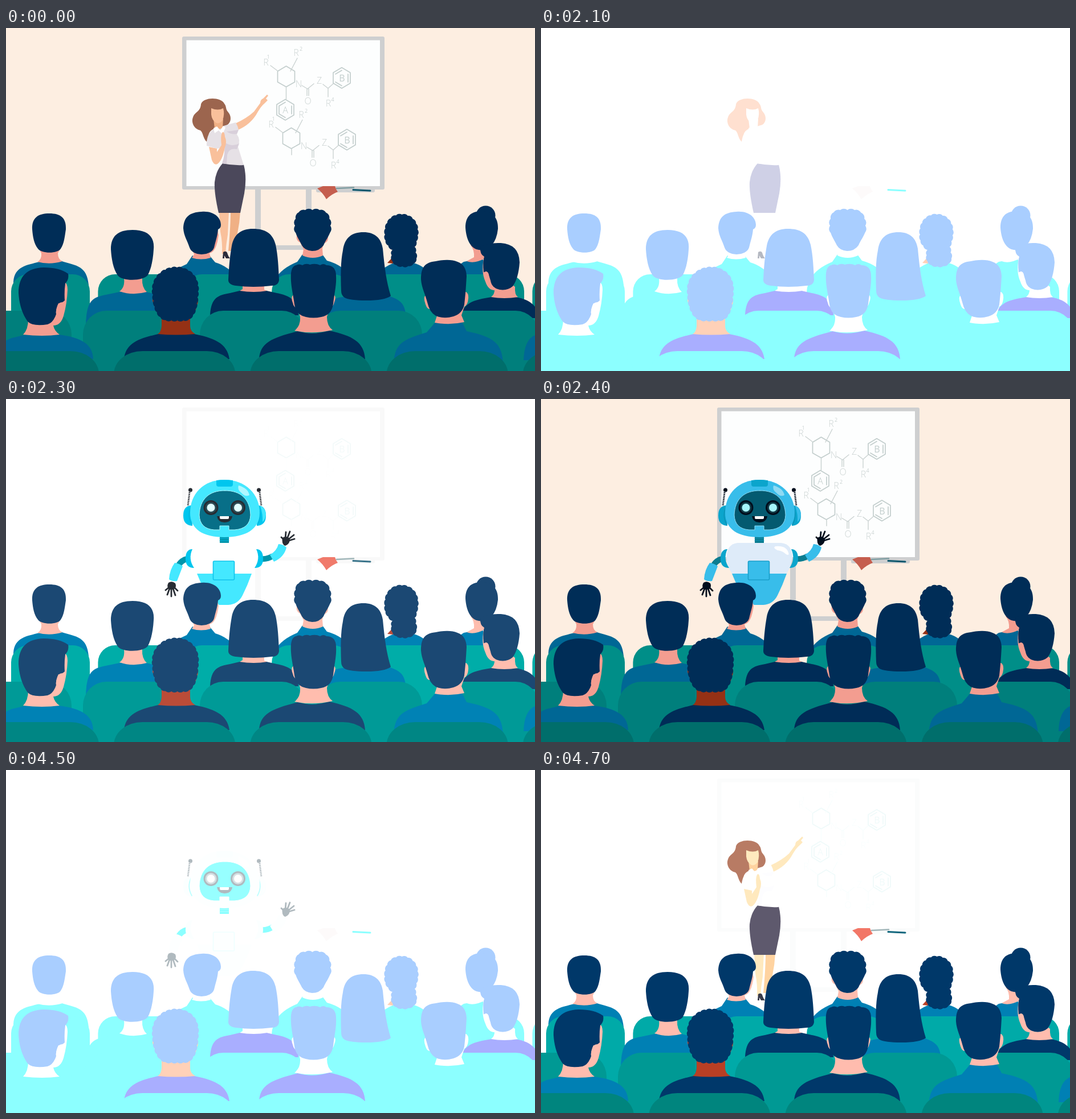
An HTML page that plays this animation: 928x603 px, repeating every 4800 ms.

```html
<!DOCTYPE html>
<html lang="en">
<head>
<meta charset="utf-8">
<title>Lecture hall</title>
<style>
html, body { margin: 0; width: 100%; height: 100%; overflow: hidden; }
svg { display: block; width: 100vw; height: 100vh; fill: currentColor; }
.ln { fill: none; stroke: currentColor; stroke-linecap: round; stroke-linejoin: round; }
text { font: 300 16px "Open Sans", Lato, sans-serif; text-anchor: middle; }
.sup { font-size: 9px; font-weight: 400; }
</style>
</head>
<body>
<svg viewBox="0 0 928 603" preserveAspectRatio="none">
  <rect class="wall" width="928" height="603"/>

  <g id="board">
    <path class="frame" d="M437,280H447V382H526V280H536V390H437Z"/>
    <rect class="frame" x="544" y="282" width="103" height="7" rx="3"/>
    <rect class="frame" x="309" y="15" width="355" height="269" rx="3"/>
    <rect class="face" x="316.500" y="21.500" width="339.500" height="256.500"/>
    <g id="formula">
      <g class="ring ln" stroke-width="1.700">
        <path d="M491.500,67L506.500,76V95L491.500,103.500L476.500,95V76Z"/>
        <path d="M589,69.500L604,78.500V97L589,106L574,97V78.500Z"/>
        <path d="M578,81L589,74.500M600,81V95M589,101.500L578,95"/>
      </g>
      <path class="bond ln" stroke-width="1.400" d="M476,75L464,66M511,53L499,76M519,101L529,107L540,98M528,107V119M531,107V119M556,99L565,106L574,98M565,106V121"/>
      <g class="bond">
        <text x="456" y="66">R</text><text class="sup" x="460" y="54">1</text>
        <text x="509" y="49">R</text><text class="sup" x="517.500" y="40">2</text>
        <text x="513.500" y="104">N</text><text x="549.500" y="98">Z</text>
        <text x="529.500" y="134">O</text>
        <text x="565.500" y="138">R</text><text class="sup" x="573" y="129">4</text>
      </g>
      <text class="ring" x="589.500" y="94" style="font-weight:400">B</text>
    </g>
    <use href="#formula" x="9" y="108.500"/>
    <path class="bond ln" stroke-width="1.500" d="M491.500,104V125M501,212V223"/>
    <path class="ring ln" stroke-width="1.700" d="M490,125.500L505,134.500V153L490,162L475,153V134.500ZM479,151V137L490,130.500M501,137V151M490,157.500L479,151"/>
    <text class="ring" x="490" y="150">A</text>
    <path class="cloth" d="M546,282L556,278H577Q579,284 582,288Q571,292 562,301Q556,290 546,282Z"/>
    <path class="pen ln" stroke-width="2.600" d="M580,282L610,280.500"/>
    <path class="marker ln" stroke-width="3" d="M609,284.500L639,286"/>
  </g>

  <g id="teacher">
    <path class="wlegdk" d="M394,322H411Q410,342 406,361L398,392H390Q394,350 394,322Z"/>
    <path class="wleg" d="M374,322H391L389,363Q386,381 385,397H379Q380,377 376,358Z"/>
    <path class="shoe" d="M381,394Q386,391 388,395Q390,402 393,405H386L383,400V405H380Z"/>
    <path class="whair" d="M342,134C346,121 377,121 383,133C387,138 385,142 389,147C398,157 394,170 384,172L367,176C352,182 357,191 352,200C346,195 346,184 341,180C328,177 325,164 328,157C331,147 341,148 342,134Z"/>
    <path class="wlegdk" d="M364,160L381,160L380,176Q374,183 366,177Z"/>
    <path class="wleg" d="M360,141Q372,146 381,141Q384,151 380,162Q375,169 369,167Q361,162 360,152Z"/>
    <path class="wleg" d="M402,168Q422,159 435,147L446,132Q446,126 451,124L458,117L460,119L456,124L459,127L453,133Q448,137 442,147Q430,170 405,180Z"/>
    <path class="skirt" d="M380,238L417,240Q423,263 418,291L411,325H373Q365,290 366,271Q368,251 380,238Z"/>
    <path class="blouse" d="M366,177Q379,180 382,172L403,166Q407,173 408,179L405,187Q412,196 407,209L417,241Q398,242 379,238Q386,224 384,210L370,212L352,207Q351,185 366,177Z"/>
    <path class="fold" d="M387,182Q396,181 408,179L405,186Q396,188 387,182ZM383,201Q397,210 409,203L405,213Q391,210 388,223L387,239L379,238Q385,222 383,201Z"/>
    <path class="collar" d="M364,176L370,173L376,180L381,172L385,175L380,187L373,180L366,185Z"/>
    <path class="wleg" d="M356,209L370,212L370,218L378,206Q376,190 379,184Q383,180 384,191Q388,200 384,210Q380,232 371,239Q365,242 361,232Z"/>
  </g>

  <g id="robot">
    <path class="rarm ln" stroke-width="10" style="stroke-linecap:butt" d="M318,281Q308,283 302,293M448,281Q458,282 468,276"/>
    <path class="rlight" d="M296,288Q304,289 310,294L300,320Q291,321 286,317Q287,300 296,288ZM463,274Q475,267 478,255Q486,255 492,261Q488,278 470,286Z"/>
    <g class="rblack">
      <path d="M285,323Q291,319 297,324Q300,331 294,335H286Q281,330 285,323ZM485,244Q492,239 498,246Q498,255 490,258Q483,256 485,244Z"/>
      <path class="ln" stroke-width="2.800" d="M286,331L280,336M287,333L283,344M290,333V347M293,333L297,345M295,331L301,337M486,246L483,243M490,246L491,234M493,246L498,233M495,247L505,239M496,249L506,246"/>
    </g>
    <g id="side">
      <path class="rblack ln" stroke-width="3" stroke-dasharray="1.800 1.200" style="stroke-linecap:butt" d="M322,164L319,188"/>
      <circle class="rblack" cx="323.500" cy="160" r="3.500"/>
      <path class="rmid" d="M325,187Q311,188 311,205Q311,222 327,223Z"/>
      <path class="redge ln" stroke-width="1.600" d="M325,189Q317,205 326,221"/>
    </g>
    <use href="#side" transform="matrix(-1 0 0 1 767 0)"/>
    <path class="rlight" d="M446,188Q455,191 456,203Q455,212 450,216Q451,203 446,188Z"/>
    <path class="rarm" d="M375,240H391V254H375Z"/>
    <path class="redge ln" stroke-width="1" d="M375,245H391M375,249H391"/>
    <path class="rlight" d="M383,142C420,142 445,167 445,200C445,229 420,243 383,243C346,243 323,229 323,200C323,167 346,142 383,142Z"/>
    <path class="rmid" d="M369,143Q383,141 398,143V150Q398,154 394,154H373Q369,154 369,150Z"/>
    <path class="shine" d="M408,152Q425,157 427,169Q420,173 413,165Q405,159 408,152Z"/>
    <path id="visor" class="visor" d="M384,161C412,161 428,176 429,204Q428,228 401,230H391V223H375V230H365Q340,228 339,204C340,176 356,161 384,161Z"/>
    <path class="shine ln" stroke-width="1" d="M384,161C412,161 428,176 429,204Q428,228 401,230H391V223H375V230H365Q340,228 339,204C340,176 356,161 384,161Z"/>
    <g id="eye">
      <circle class="rblack" cx="359.500" cy="191" r="13"/>
      <circle class="iris" cx="359.500" cy="191" r="10"/>
      <circle class="glow" cx="359.500" cy="191" r="7"/>
    </g>
    <use href="#eye" x="47.500"/>
    <path class="rblack" d="M370,206H397Q395,217 383,217Q372,217 370,206Z"/>
    <path class="tooth" d="M375,206H391V209Q391,211 389,211H377Q375,211 375,209Z"/>
    <path class="rbody" d="M345,253H421Q441,255 441,279Q438,296 431,307H335Q327,296 325,279Q326,255 345,253Z"/>
    <path class="tooth" d="M411,259Q430,257 434,270Q436,276 430,273Q424,267 415,266Q406,262 411,259Z"/>
    <path class="rlight" d="M335,307H431Q424,327 415,345Q407,361 390,362H375Q360,360 351,345Z"/>
    <rect class="rlight" x="363" y="285" width="37.500" height="33" rx="2"/>
    <rect class="panel ln" stroke-width="1.600" x="363.500" y="285" width="37" height="33" rx="2"/>
    <path id="pad" class="rmid" d="M327,264Q315,264 315,281Q315,297 330,297Q319,281 327,264Z"/>
    <use href="#pad" transform="matrix(-1 0 0 1 766 0)"/>
  </g>

  <g id="back">
    <path class="blue" d="M13,446C15,419 36,417 59,411Q77,415 98,410C124,418 142,418 145,452V480H13Z"/>
    <path class="skin" d="M52,376L62,396Q63,407 55,411Q77,417 99,410Q91,407 91,396L101,376Z"/>
    <path class="hair" d="M46,354C45,333 57,326 76,326C96,326 106,334 105,354C103,367 102,379 96,388C91,397 62,397 56,388C49,379 47,367 46,354Z"/>

    <path class="blue" d="M283,440Q295,424 317,415L327,400Q342,409 357,400L367,412Q391,419 405,440Z"/>
    <path class="skin" d="M325,385L330,398L326,404Q342,409 359,404L357,396Q369,394 373,364L370,352Z"/>
    <path class="hair" d="M311,352C312,332 322,324 343,323C364,321 377,333 377,346Q377,352 372,354C371,366 368,373 365,386Q361,397 343,398Q326,397 322,386C318,373 312,366 311,352Z"/>

    <path class="blue" d="M473,440Q484,422 511,411L520,398Q538,407 555,398L563,409Q593,417 606,440Z"/>
    <path class="skin" d="M510,364Q508,374 516,377L522,389L520,400Q538,408 556,400L555,388Q557,378 561,377Q567,373 564,364Z"/>
    <path class="hair" data-bumps="10" d="M508,360C505,337 509,321 523,320L552,320C567,322 571,341 568,360"/>
    <path class="hair" d="M507,355H570C567,366 560,374 557,382Q550,392 537,392Q524,391 519,382C515,373 509,366 507,355Z"/>

    <path class="blue" d="M640,440Q662,420 680,413H715Q737,419 748,440Z"/>
    <path class="dark" d="M669,413L679,402V414Z"/>
    <path class="hair" data-bumps="24" d="M665,363C664,338 679,328 693,328C710,328 724,339 722,364C720,379 715,384 717,392C724,403 720,419 699,419C679,420 672,408 679,391C667,381 664,373 665,363Z"/>

    <path class="blue" d="M785,440Q789,419 803,411L835,405L858,440Z"/>
    <path class="skin" d="M815,382Q822,390 821,403L808,410Q822,415 840,405V384Z"/>
    <circle class="hair" cx="841.500" cy="329.500" r="17"/>
    <path class="hair" d="M806,351C806,331 816,322 834,322C852,321 864,333 863,353Q861,372 852,382Q840,394 825,389C811,383 807,365 806,351Z"/>
  </g>
  <g id="rowA" class="seatA"></g>

  <g id="middle">
    <path class="blue" d="M140,520C142,479 151,474 175,469L204,463Q222,471 242,463C275,471 308,474 310,520Z"/>
    <path class="skin" d="M190,418Q196,435 207,440Q209,456 199,463Q222,471 247,464Q238,456 239,440Q252,434 254,418Z"/>
    <path class="hair" d="M184,389C184,366 196,355 222,355C249,355 261,367 259,389C258,407 255,422 249,434C242,445 204,446 196,435C188,423 185,406 184,389Z"/>

    <path class="navy" d="M358,505C360,473 372,470 393,466L414,461Q434,465 453,461L475,466C496,470 512,477 513,505Z"/>
    <path class="skin" d="M415,450H453V460L458,462Q435,466 410,462L415,459Z"/>
    <path class="hair" d="M390,443C391,418 393,400 396,383C400,362 413,353 433,353C455,353 468,361 473,381C477,400 478,420 479,443Q478,453 466,453Q434,457 403,453Q390,451 390,443Z"/>

    <path class="blue" d="M548,505C552,483 570,476 590,473L663,469C688,475 700,482 701,505Z"/>
    <path class="hair" d="M588,462C587,435 587,410 591,391C594,368 607,359 627,359C647,359 658,369 661,388C664,420 667,445 675,471Q664,479 632,479Q603,479 594,474Q588,470 588,462Z"/>

    <path class="navy" d="M798,505C804,484 818,478 852,473Q875,475 893,473C914,476 927,484 934,500V510H798Z"/>
    <path class="skin" d="M840,398Q832,426 841,446Q846,461 857,461Q857,468 851,473Q874,477 898,473Q892,469 893,455L860,430L848,435Z"/>
    <path class="hair" d="M832,385Q844,377 868,378Q900,380 901,412Q899,440 889,454Q880,462 866,460Q852,457 850,444L846,431Q844,426 838,430Q836,410 839,402Q831,398 832,385Z"/>
    <path class="skin" d="M837,430Q845,425 847,434Q848,443 849,448Q841,447 837,430Z"/>
  </g>
  <g id="rowB" class="seatB"></g>

  <g id="front">
    <path class="blue" d="M-30,580Q-10,552 10,545L35,539Q64,543 92,539C133,544 152,556 153,582H-30Z"/>
    <path class="skin" d="M102,445Q108,449 108,460Q107,485 101,506Q96,523 83,523Q85,533 94,539Q64,543 30,539Q39,530 39,512L85,490Z"/>
    <path class="hair" d="M22,466C22,436 37,422 66,421Q94,421 109,432Q111,442 104,449Q102,463 103,479Q98,484 92,484Q87,494 88,503Q83,518 73,521Q47,525 38,516C28,502 23,484 22,466Z"/>
    <path class="skin" d="M101,483Q93,480 90,490Q86,499 89,506L96,505Z"/>

    <path class="navy" d="M207,582C210,554 233,545 272,537Q297,541 324,537C365,544 388,554 392,582Z"/>
    <path class="dark" d="M260,472Q254,476 260,488Q263,499 273,508V524Q272,535 266,538Q298,541 332,538Q323,533 323,524V508Q333,500 335,488Q340,476 334,472Z"/>
    <path class="hair" data-bumps="27" d="M258,469C253,439 276,421 298,421C322,421 341,438 336,469C335,493 329,513 314,514H283C267,513 259,492 258,469Z"/>

    <path class="navy" d="M444,582C446,553 466,545 512,533Q538,541 567,532C608,541 628,552 630,582Z"/>
    <path class="skin" d="M504,469Q499,473 503,483Q505,492 512,494L516,508Q517,524 506,532Q538,539 573,531Q563,524 563,508L567,493Q574,491 576,482Q580,472 575,469Z"/>
    <path class="hair" d="M500,445C499,428 501,419 509,417Q514,414 520,417Q526,413 533,416Q543,413 551,417Q557,413 562,417Q579,417 579,436C580,452 576,466 574,485Q571,505 553,508Q539,511 526,508Q508,504 506,486C504,470 501,460 500,445Z"/>

    <path class="blue" d="M680,590C682,555 695,548 738,535L755,515Q778,525 799,515L808,533C855,543 870,553 872,590Z"/>
    <path class="skin" d="M735,471Q732,475 736,486Q739,495 744,494L756,506L752,518Q778,523 804,517L799,505L804,490Q810,487 811,476Q812,467 807,464Z"/>
    <path class="hair" d="M728,442C728,420 735,412 754,410Q778,405 792,411Q807,416 808,436C807,454 806,469 804,486Q801,502 785,507Q768,512 754,506Q743,500 739,482C736,469 729,457 728,442Z"/>
    <path class="blue" d="M908,584Q909,548 928,540V584Z"/>
  </g>
  <g id="rowC" class="seatC"></g>
</svg>

<script>
const $ = id => document.getElementById(id);

// Colours per exposure: normal, bright (teacher), blown out, bright (robot)
const palette = {
  wall: '#fdeee1 #fff #fff #fff',
  frame: '#cecfd0 #fbfcfc #fff #f9f9f9',
  face: '#fdfefe #fff #fff #fff',
  ring: '#c3cecd #effafa #fff #f3fafa',
  bond: '#cbd3d2 #f8fefe #fff #fdfefe',
  cloth: '#c55e4e #f27767 #fdfafa #f07a6b',
  pen: '#7f9da2 #a2b6b9 #fff #a0b6b9',
  marker: '#0d566c #10667d #8cffff #39738a',
  hair: '#002d57 #003869 #a9ceff #1b4873',
  navy: '#002c57 #00386a #a9aeff #1b4873',
  blue: '#006795 #0080b4 #8cffff #0082b5',
  skin: '#f39d90 #ffbcae #fff #ffbdae',
  dark: '#953115 #b93f24 #ffd1b8 #bb4c38',
  seatA: '#008e88 #00aaa8 #8cffff #00ada8',
  seatB: '#007f7c #009994 #8cffff #009a97',
  seatC: '#006e6b #00857e #8cffff #008684',
  whair: '#9c654e #b87b64 #ffe0d0 #b87b64',
  wleg: '#f9c09b #ffe9be #fff #ffe9be',
  wlegdk: '#f0b085 #ffd3a0 #fff #ffd3a0',
  blouse: '#e6e1e6 #fff #fff #fff',
  fold: '#d8cfda #fdfdff #fff #fff',
  collar: '#fff #fff #fff #fff',
  skirt: '#4b485b #5e596d #cfd0e6 #5e596d',
  shoe: '#2a2b3a #383a49 #b5b9c2 #383a49',
  rlight: '#38bdea #44e8ff #fdffff #44e8ff',
  rmid: '#0ba5cc #00c6ee #fbffff #00c6ee',
  redge: '#0c93b8 #00b2dc #b8ffff #00b8e0',
  panel: '#1a9fca #10c4ec #efffff #10c4ec',
  rarm: '#0b7c90 #0095ab #8cffff #0095ab',
  rblack: '#000d1c #272c33 #b0babf #272c33',
  visor: '#045a70 #086f88 #97ffff #086f88',
  iris: '#123c48 #2b4b55 #d5e0e3 #2b4b55',
  glow: '#a5f4fa #d8ffff #fff #e2ffff',
  shine: '#8fdaf3 #b0f7ff #fff #b0f7ff',
  tooth: '#fff #fff #fff #fff',
  rbody: '#deebf9 #fff #fff #fff'
};
for (const k in palette) palette[k] = palette[k].split(' ');

const sheet = document.createElement('style');
sheet.textContent = Object.keys(palette).map(k => `.${k}{color:var(--${k})}`).join('');
document.head.append(sheet);

// Evenly spaced seat backs
function seats(id, x, top, width, step, rx, ry) {
  let out = '';
  for (; x < 928; x += step)
    out += `<rect x="${x}" y="${top}" width="${width}" height="200" rx="${rx}" ry="${ry}"/>`;
  $(id).innerHTML = out;
}
seats('rowA', 9, 433, 138, 152.4, 30, 30);
seats('rowB', -70, 497, 185, 205, 41, 42);
seats('rowC', -50, 568, 213, 239.2, 50, 40);

// Curly hair: turn an outline into a chain of outward arcs
for (const path of document.querySelectorAll('[data-bumps]')) {
  const n = +path.dataset.bumps, len = path.getTotalLength(), r = len / n * 0.76;
  let d = '';
  for (let i = 0; i <= n; i++) {
    const p = path.getPointAtLength(len * i / n);
    d += (i ? `A${r},${r} 0 0 1 ` : 'M') + p.x.toFixed(1) + ',' + p.y.toFixed(1);
  }
  path.setAttribute('d', d + 'Z');
}

// start time, exposure, robot on stage
const steps = [
  [0, 0, 0], [2000, 1, 0], [2100, 2, 0], [2200, 2, 1], [2300, 3, 1],
  [2400, 0, 1], [4400, 3, 1], [4500, 2, 1], [4600, 2, 0], [4700, 1, 0]
];
const svg = document.querySelector('svg');
let shown;

function draw(ms) {
  const t = ms % 4800;
  const step = steps.filter(s => s[0] <= t).pop();
  if (step === shown) return;
  shown = step;
  const [, exposure, robot] = step;
  for (const k in palette) svg.style.setProperty('--' + k, palette[k][exposure]);
  $('teacher').style.display = robot ? 'none' : '';
  $('robot').style.display = robot ? '' : 'none';
}

const start = performance.now();
function tick() {
  draw(performance.now() - start);
  requestAnimationFrame(tick);
}
draw(0);
requestAnimationFrame(tick);
</script>
</body>
</html>
```
